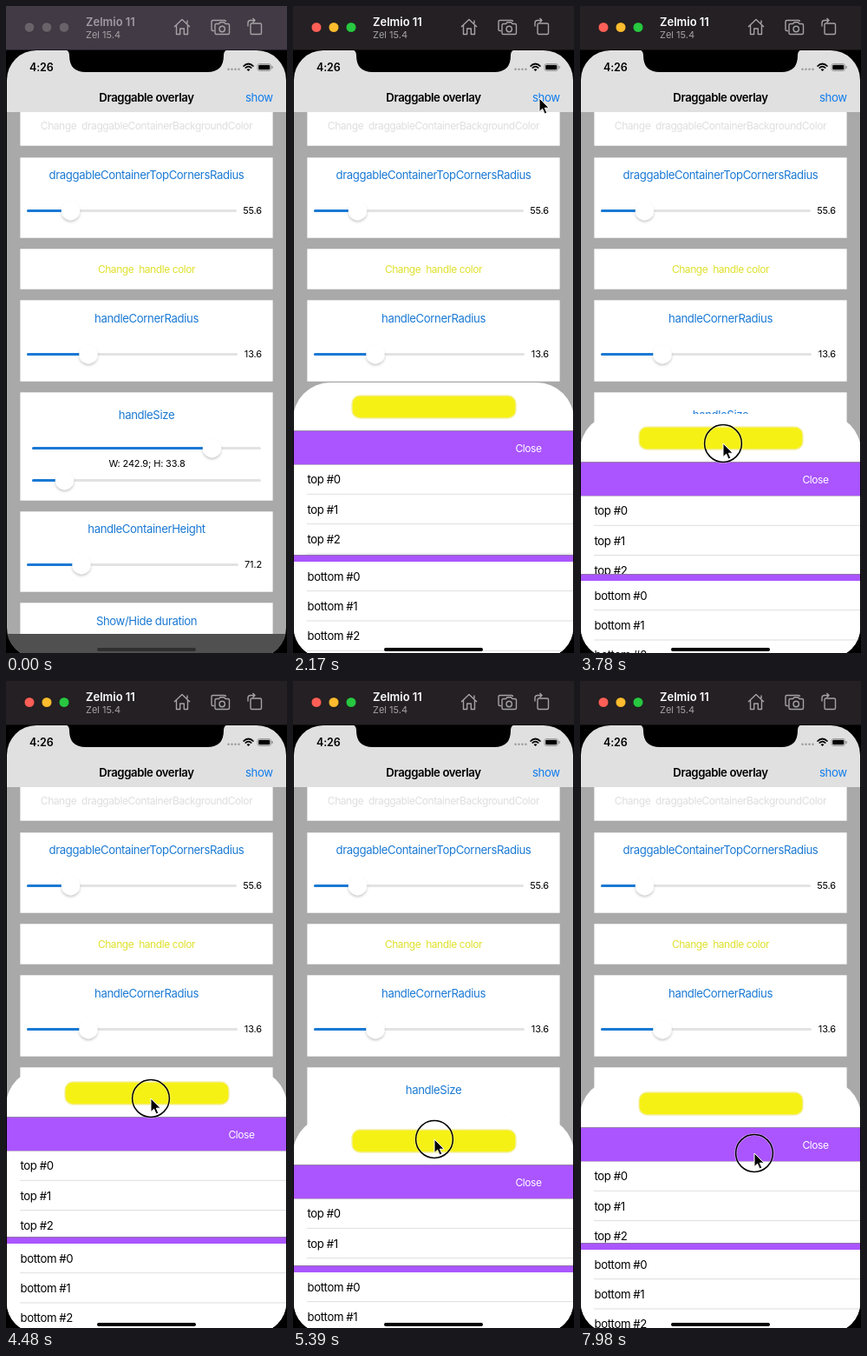
An HTML page for the animation above (8000 ms loop, 324 by 744 pixels).

```html
<!DOCTYPE html>
<html lang="en">
<head>
<meta charset="utf-8">
<title>Draggable overlay</title>
<style>
  html, body { margin: 0; width: 100%; height: 100%; overflow: hidden; background: #000; }
  svg { display: block; width: 100vw; height: 100vh; }
  text { font: 13.2px Inter, Roboto, sans-serif; letter-spacing: -.4px; white-space: pre; }
  .mid { text-anchor: middle; }
  .blue { fill: #1a79d4; }
  .small { font-size: 12px; letter-spacing: -.44px; }
  .value { font-size: 11px; letter-spacing: -.15px; }
  .bold { font-weight: 600; }
  .line { fill: none; stroke: #a5a2a5; stroke-width: 1.4; stroke-linejoin: round; }
</style>
</head>
<body>
<svg id="stage" viewBox="0 0 324 744"></svg>
<script>
const rect = (x, y, w, h, fill, more = '') =>
  `<rect x="${x}" y="${y}" width="${w}" height="${h}" fill="${fill}" ${more}/>`;
const text = (x, y, label, cls = '', more = '') =>
  `<text x="${x}" y="${y}" class="${cls}" ${more}>${label}</text>`;
const card = (top, bottom) => rect(16.4, top + 0.3, 291.2, bottom - top - 0.6, '#fff');
const heading = (y, label) => text(162, y, label, 'mid blue');

function slider(y, left, right, thumb, value) {
  return rect(left, y - 1.5, right - left, 3, '#e3e3e4', 'rx="1.5"') +
    rect(left, y - 1.5, thumb - left, 3, '#1a79d4', 'rx="1.5"') +
    `<circle cx="${thumb}" cy="${y}" r="10.7" fill="#fff" filter="url(#shadow)"/>` +
    (value ? text(295, y + 3.8, value, 'value', 'text-anchor="end"') : '');
}

// Three list rows, each with a separator below
const rows = (name, top) => [0, 1, 2].map(i => {
  const y = top + i * 34.3;
  return text(16.5, y + 22, `${name} #${i}`) + rect(16, y + 33.5, 308, 1, '#dedee0');
}).join('');

const settings =
  rect(0, 122, 324, 622, '#a9a9a9') +
  card(110, 161) + text(162, 142.3, 'Change  draggableContainerBackgroundColor', 'mid small', 'fill="#dedede"') +
  card(174, 267) + heading(198.5, 'draggableContainerTopCornersRadius') + slider(235.5, 24, 266, 74.5, '55.6') +
  card(279, 326) + text(162, 307.3, 'Change  handle color', 'mid small', 'fill="#dfe02c"') +
  card(338, 432) + heading(363.5, 'handleCornerRadius') + slider(400.5, 24, 267, 95, '13.6') +
  card(444, 569) + heading(475, 'handleSize') + slider(508.5, 30, 294, 237.5) +
  text(162.5, 530, 'W: 242.9; H: 33.8', 'mid value') + slider(545.5, 30, 294, 67.5) +
  card(581, 674) + heading(606, 'handleContainerHeight') + slider(642.5, 24, 268, 87, '71.2') +
  card(686, 744) + heading(711.5, 'Show/Hide duration');

const sheet =
  '<path d="M0 760V476A43 43 0 0 1 43 433H281A43 43 0 0 1 324 476V760Z" fill="#fff"/>' +
  rect(68, 448, 189, 26, '#f6f115', 'rx="9" stroke="#f4f0a0" stroke-width="1.4"') +
  rect(0, 489, 324, 38, '#aa55ff') + rect(0, 488, 324, 1, '#9a86ac') + rect(0, 527, 324, 1, '#c4b4d2') +
  text(271.5, 512.5, 'Close', 'mid small', 'fill="#fff"') +
  rows('top', 527.3) +
  `<g id="lower">${rect(0, 631, 324, 200, '#fff')}${rect(0, 632, 324, 7, '#aa55ff')}` +
  `${rect(0, 631, 324, 1, '#8f72ad')}${rows('bottom', 638.7)}</g>`;

const statusBar =
  rect(0, 50, 324, 72, '#e0e0e0') +
  '<path d="M66 50Q73 50 73 57Q73 76 92 76H232Q251 76 251 57Q251 50 258 50Z"/>' +
  text(27, 75, '4:26', 'bold', 'style="font-size:12.5px;letter-spacing:-.1px"') +
  [0, 1, 2, 3].map(i => `<circle cx="${256.5 + i * 4}" cy="72.7" r="1.2" fill="#999"/>`).join('') +
  '<path d="M273.5 69.5Q279.5 63.5 285.5 69.5M275.7 71.5Q279.5 67.7 283.3 71.5" fill="none" stroke="#000" stroke-width="1.7"/>' +
  '<path d="M277.5 73Q279.5 71.4 281.5 73L279.5 75Z"/>' +
  rect(290, 66.5, 15.5, 8, 'none', 'rx="2.3" stroke="#888" stroke-width=".8"') +
  rect(291.2, 67.7, 13.1, 5.6, '#000', 'rx="1.2"') + rect(306.5, 69, 1.2, 3, '#888', 'rx=".6"') +
  text(162, 110.3, 'Draggable overlay', 'mid bold') +
  text(276, 110, 'show', '', 'fill="#0f7cec"');

const icons =
  '<path class="line" d="M194 24L203 15.5L212 24M196.5 22V32.5H200.7V26H205.3V32.5H209.5V22M209 20V16.5"/>' +
  '<path class="line" d="M240 28.5H238.5Q237 28.5 237 27V18Q237 16.5 238.5 16.5H252Q253.5 16.5 253.5 18"/>' +
  '<path class="line" d="M242.5 20.5H245.5L247 18.8H251.5L253 20.5H256Q257.5 20.5 257.5 22V31Q257.5 32.5 256 32.5H242.5Q241 32.5 241 31V22Q241 20.5 242.5 20.5Z"/>' +
  '<circle class="line" cx="249.2" cy="26.5" r="3.2"/>' +
  '<rect class="line" x="282" y="20" width="12.5" height="12.5" rx="1.5"/>' +
  '<path class="line" d="M279 23.5V19.5Q279 16.5 282 16.5H286.5M284.5 14L287 16.5L284.5 19"/>';

const lights = ['#ff5f57', '#febc2e', '#28c840'];

stage.innerHTML = `
  <defs>
    <filter id="shadow" x="-50%" y="-50%" width="200%" height="200%">
      <feDropShadow dx="0" dy="2" stdDeviation="1.8" flood-opacity=".22"/>
    </filter>
    <clipPath id="screen"><rect x="1" y="51" width="322" height="698" rx="34"/></clipPath>
  </defs>
  ${rect(0, 0, 324, 744, '#000')}
  <g clip-path="url(#screen)">
    ${settings}
    <g id="sheet">${sheet}</g>
    ${statusBar}
    ${rect(0, 722, 324, 22, '#505050', 'id="shade"')}
  </g>
  ${rect(105, 738, 114, 4, '#000', 'id="indicator" rx="2"')}
  ${rect(0, 0, 324, 50.5, '#242023', 'id="titleBar"')}
  ${lights.map((c, i) => `<circle class="light" cx="${27 + i * 20}" cy="24.5" r="5.6" stroke="#000" stroke-opacity=".2" stroke-width=".8"/>`).join('')}
  ${text(92, 23, 'Zelmio 11', 'bold', 'id="device" style="font-size:13px;letter-spacing:0"')}
  ${text(92, 37, 'Zel 15.4', '', 'fill="#a5a2a5" style="font-size:11px;letter-spacing:0"')}
  ${icons}
  <g id="cursor">
    <g id="ring" fill="none">
      <circle r="21.4" stroke="#fff" stroke-opacity=".4" stroke-width="3"/>
      <circle r="21.4" stroke="#000" stroke-width="1.5"/>
    </g>
    <path d="M0 0V15.5L3.6 12.2L6.1 18L8.8 16.8L6.3 11.2H11.2Z" fill="#000" stroke="#fff"/>
  </g>`;

const el = id => document.getElementById(id);
const LOOP = 8000, STEP = 70;

// Time followed by values; sine easing between neighbours
const slidePath = [[1680, 315], [2170, 0]];
const dragPath = [[2940, 0], [3570, 44], [3640, 44], [4130, 0], [4270, 0], [5110, 89],
  [5152, 89], [5880, 0], [7280, 0], [7980, 25]];
// Pointer position relative to the dragged sheet
const pointerPath = [[0, -20, 700], [350, 150, 354], [560, 150, 354], [840, 326, 150],
  [910, 326, 134], [1400, 284, 106], [2200, 284, 106], [2660, 162, 477], [2730, 162, 477],
  [2870, 165, 467], [3780, 165, 467], [4270, 166, 465], [4900, 170, 472], [5390, 163, 459],
  [5880, 168, 453], [6020, 168, 453], [6510, 283, 110], [6790, 283, 110], [7140, 201, 502],
  [7280, 201, 502], [7980, 201, 518]];

function sample(path, t) {
  const next = path.findIndex(p => p[0] > t);
  if (next === 0) return path[0].slice(1);
  if (next < 0) return path.at(-1).slice(1);
  const a = path[next - 1], b = path[next];
  const k = (1 - Math.cos(Math.PI * (t - a[0]) / (b[0] - a[0]))) / 2;
  return a.slice(1).map((v, i) => v + (b[i + 1] - v) * k);
}

const move = (id, x, y) =>
  el(id).setAttribute('transform', `translate(${Math.round(x)} ${Math.round(y)})`);

function draw(t) {
  const active = t >= 1540;
  const [slide] = sample(slidePath, t);
  const [drag] = sample(dragPath, t);
  const [x, y] = sample(pointerPath, t);
  const pressed = (t >= 1540 && t < 1680) || (t >= 3010 && t < 5880) || t >= 7350;

  move('sheet', 0, slide + drag);
  // The divider follows the drag at 60 %, squeezing the upper list
  move('lower', 0, -0.4 * drag);
  move('cursor', x, y + drag);
  el('ring').style.display = pressed ? '' : 'none';

  el('shade').style.display = active ? 'none' : '';
  el('indicator').setAttribute('fill', active ? '#000' : '#303030');
  el('titleBar').setAttribute('fill', active ? '#242023' : '#423a45');
  el('device').setAttribute('fill', active ? '#fff' : '#a19aa3');
  document.querySelectorAll('.light').forEach((c, i) =>
    c.setAttribute('fill', active ? lights[i] : '#696269'));
}

const start = performance.now();
function tick() {
  const t = (performance.now() - start) % LOOP;
  draw(Math.floor(t / STEP) * STEP);
  requestAnimationFrame(tick);
}
tick();
</script>
</body>
</html>
```
